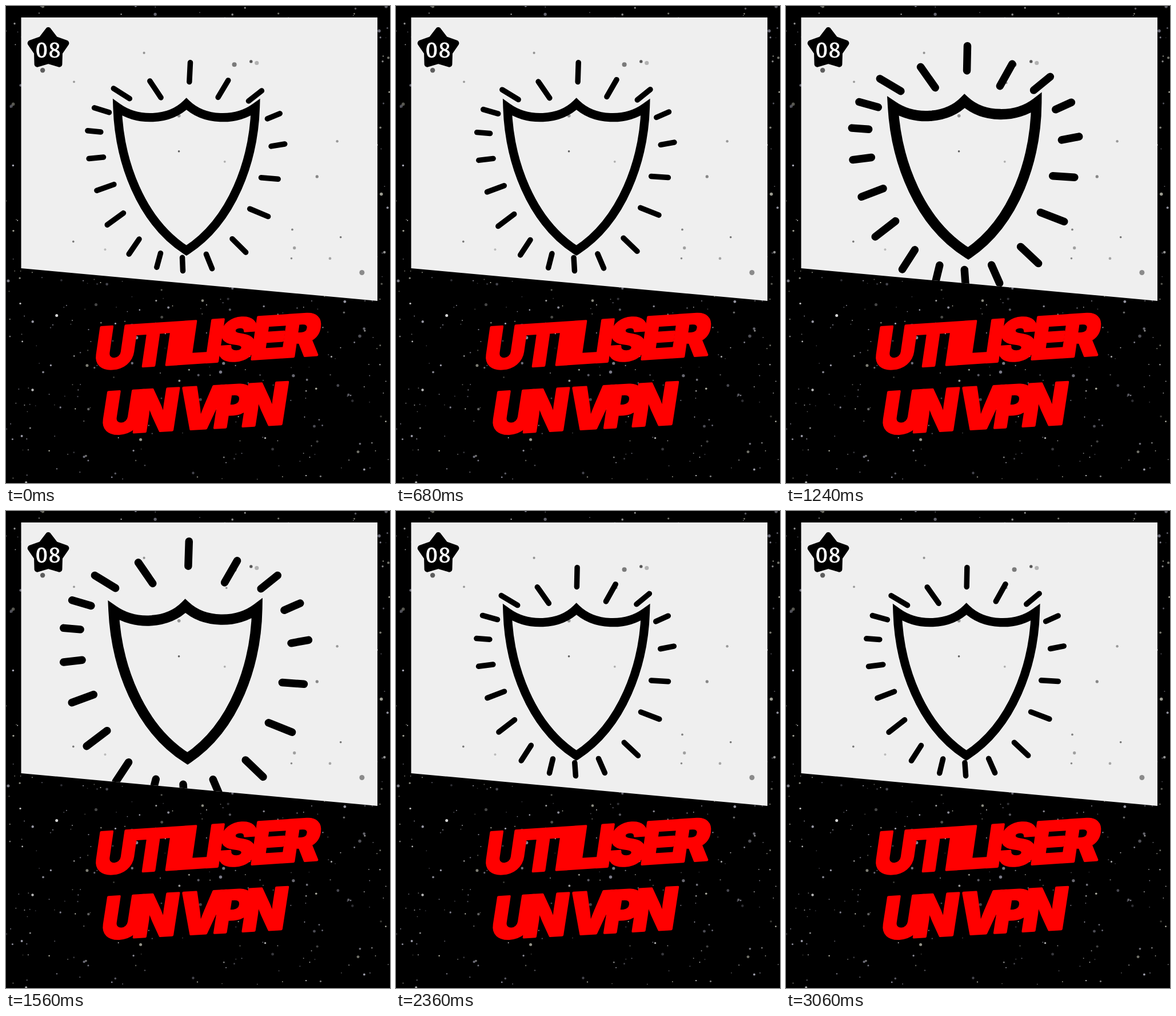
These frames come from a looping animation (672x833 px, 3160 ms). An HTML page:

```html
<!DOCTYPE html>
<html lang="fr">
<head>
<meta charset="utf-8">
<title>Utiliser un VPN</title>
<style>
  html, body { margin: 0; width: 100%; height: 100%; overflow: hidden; background: #000; }
  svg { display: block; width: 100vw; height: 100vh; }
  .title { font: 900 100px Inter, Roboto, sans-serif; fill: #f00; stroke: #f00; stroke-width: 4; stroke-linejoin: round; }
  .badge { font: 37px "Noto Serif", "Liberation Serif", serif; fill: #fff; stroke: #fff; stroke-width: 0.8; letter-spacing: 2px; }
</style>
</head>
<body>
<svg viewBox="0 0 672 833">
  <defs><clipPath id="cardClip"><path d="M26.5 20H650V515L26.5 458Z"/></clipPath></defs>
  <rect width="672" height="833"/>
  <g id="stars"></g>
  <path d="M26.5 20H650V515L26.5 458Z" fill="#efefef"/>
  <g clip-path="url(#cardClip)">
    <g id="specks" fill="#444"></g>
    <g id="rays" fill="none" stroke="#000" stroke-linecap="round"></g>
    <path id="shield" fill="none" stroke="#000" stroke-miterlimit="10" d="M195 177C230 202 285 201 315.75 171C347 201 402 202 436.5 177C433.5 270 396.5 375 315.75 427C235 375 198 270 195 177Z"/>
  </g>
  <path id="star" stroke="#000" stroke-width="10" stroke-linejoin="round"/>
  <text class="badge" x="52" y="90">08</text>
  <text class="title" transform="translate(151 635) rotate(-3.7) skewX(-12)" letter-spacing="-7.8">UTILISER</text>
  <text class="title" transform="translate(163 748) rotate(-3.2) skewX(-12)" letter-spacing="-16" word-spacing="13">UN VPN</text>
</svg>
<script>
const $ = id => document.getElementById(id);
const { PI, sin, cos, exp, min, max, abs, floor } = Math;
const rad = degrees => degrees * PI / 180;

function add(parent, tag, attrs = {}) {
  const el = document.createElementNS('http://www.w3.org/2000/svg', tag);
  for (const name in attrs) el.setAttribute(name, attrs[name]);
  return parent.appendChild(el);
}

// Point at a clockwise angle from straight up
const polar = (x, y, angle, radius) => [x + radius * sin(rad(angle)), y - radius * cos(rad(angle))];

let seed = 8;
function random() {
  seed = (seed * 16807) % 2147483647;
  return seed / 2147483647;
}

function scatter(parent, count, width, height, minSize, spread, colors) {
  for (let i = 0; i < count; i++) {
    add(parent, 'circle', {
      cx: (random() * width).toFixed(1),
      cy: (random() * height).toFixed(1),
      r: (minSize + spread * random() ** 3).toFixed(2),
      fill: colors[i % colors.length],
      opacity: (0.25 + 0.6 * random()).toFixed(2)
    });
  }
}
scatter($('stars'), 680, 672, 833, 0.9, 1.9, ['#fff', '#ccd', '#ddc', '#99a']);
scatter($('specks'), 22, 650, 480, 1.8, 3, ['#333']);

const corners = Array.from({ length: 10 }, (_, i) => polar(74, 75, i * 36, i % 2 ? 21 : 33));
$('star').setAttribute('d', 'M' + corners.join('L') + 'Z');

// Hand-drawn rays: an even ring, made uneven by a few waves
const CENTER = [315, 290], RAYS = 19;
const rays = Array.from({ length: RAYS }, (_, i) => {
  const turn = i * 360 / RAYS, phi = rad(turn);
  const angle = turn + 5.9 - 5 * cos(phi) - 2.4 * sin(phi) + 5 * cos(3 * phi - rad(75));
  const a = rad(angle);
  const radius = 159 + 4 * cos(a) - 15 * cos(3 * a) - 9 * cos(4 * a) + 37 * exp(-((angle / 10) ** 2));
  const lean = angle - 5 * (1 - exp(-angle / 30)) + 7 * sin(a) + 9 * sin(2 * a);
  const length = 29 + 6 * cos(1.1 * (i - 6.3));
  return { angle, radius, lean, length, el: add($('rays'), 'path') };
});

// Twelve steps per beat of 560 ms, the last one held
const LOOP = 3160, BEAT = 560, STEP = 460 / 11;
function stepTime(time) {
  const beat = floor((time + 20) / BEAT) * BEAT - 20;
  const step = min(11, floor((time - beat + 0.01) / STEP));
  return min(3060, max(0, beat + step * STEP));
}

function draw(time) {
  const t = stepTime(time);
  const sway = 0.95 * (cos(2 * PI * t * 3 / 2680) - 1);
  const burst = cos(PI / 2 * min(1, abs(t - 1570) / 780)) ** 2;
  const size = min(1, 2.2 * burst);
  const stretch = 1 + 0.28 * size;

  $('rays').setAttribute('transform', `rotate(${sway} ${CENTER})`);
  $('rays').setAttribute('stroke-width', 9.5 + 4 * size);
  for (const { angle, radius, lean, length, el } of rays) {
    const middle = polar(...CENTER, angle, radius + 41 * burst);
    const half = length * stretch / 2;
    el.setAttribute('d', `M${polar(...middle, lean, -half)}L${polar(...middle, lean, half)}`);
  }

  const scale = 1 + 0.04 * size;
  $('shield').setAttribute('transform',
    `translate(315.75 299) rotate(${0.85 * sway * size}) scale(${scale}) translate(-315.75 -299)`);
  $('shield').setAttribute('stroke-width', (15.3 + 3 * size) / scale);
}

const start = performance.now();
function tick() {
  draw((performance.now() - start) % LOOP);
  requestAnimationFrame(tick);
}
tick();
</script>
</body>
</html>
```
